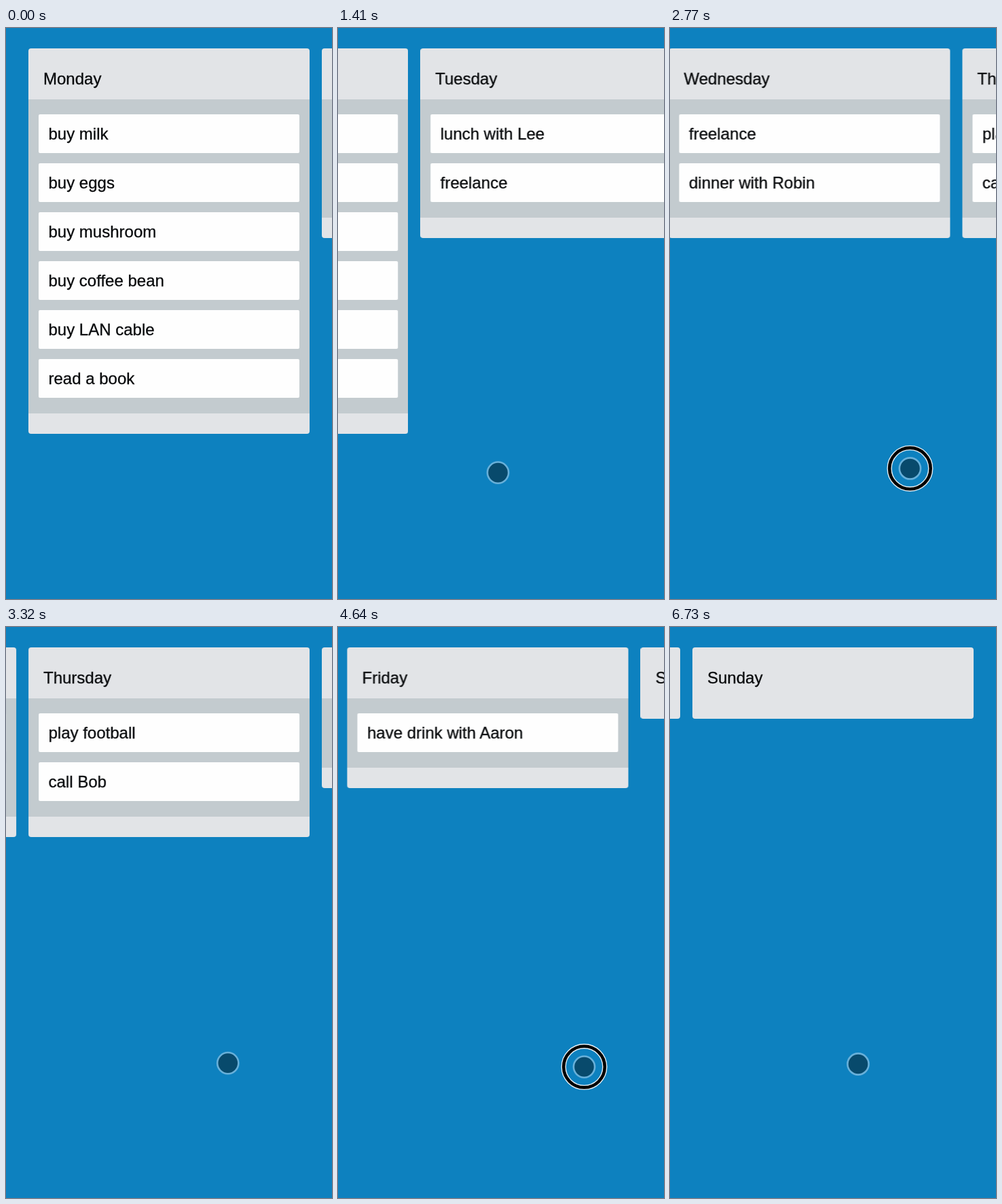
Write an HTML page with a canvas that moves like this. It is 480x840 px and loops after 7190 ms.

```html
<!DOCTYPE html>
<html lang="en">
<head>
<meta charset="utf-8">
<title>Week board</title>
<style>
html, body { margin: 0; width: 100%; height: 100%; overflow: hidden; background: #0d81bf; }
body { position: relative; font: 24px "Liberation Sans", Arial, sans-serif; color: #080a0c; }
#board {
  position: absolute; left: 32.6px; top: 30px; will-change: transform;
  -webkit-text-stroke: 0.3px #080a0c;
}
.list {
  position: absolute; top: 0; width: 414px; padding-bottom: 30px;
  background: #e2e4e7; border-radius: 4px; white-space: nowrap;
}
.title { height: 75px; line-height: 89px; padding-left: 22px; }
.cards { padding: 22px 15px 23px; background: #c3cbcf; }
.card {
  height: 57px; line-height: 57px; padding-left: 14.5px; margin-top: 15px;
  background: #fefefe; border-radius: 2px;
}
.card:first-child { margin-top: 0; }
canvas { position: absolute; left: 0; top: 0; }
</style>
</head>
<body>
<div id="board"></div>
<canvas id="pointer" width="480" height="840"></canvas>
<script>
const LOOP = 7190, FPS = 22, PITCH = 432;
const ENTER = 140, SETTLE = 770, SNAP = 350;
const REACH = 300, LEFT = 40, DRAG_Y = 663;

const week = [
  ["Monday", "buy milk", "buy eggs", "buy mushroom", "buy coffee bean", "buy LAN cable", "read a book"],
  ["Tuesday", "lunch with Lee", "freelance"],
  ["Wednesday", "freelance", "dinner with Robin"],
  ["Thursday", "play football", "call Bob"],
  ["Friday", "have drink with Aaron"],
  ["Saturday"],
  ["Sunday"]
];

// Each swipe is pressed at (x, y) and drags left until it is released.
const swipes = [
  { down: 860, up: 1275, x: 390, y: 688 },
  { down: 1980, up: 2242, x: 385, y: 645 },
  { down: 2715, up: 2975, x: 388, y: 646 },
  { down: 3800, up: 4060, x: 378, y: 637 },
  { down: 4598, up: 4868, x: 382, y: 646 },
  { down: 5575, up: 5775, x: 196, y: 650 }
];
const entry = { x: 480, y: 668 };
const rest = { down: 6730, x: 277, y: 643 };

const clamp = u => Math.min(1, Math.max(0, u));
const smooth = u => u * u * (3 - 2 * u);
const easeOut = u => 1 - (1 - u) ** 3.2;
const part = (t, from, to) => clamp((t - from) / (to - from));
const mix = (a, b, u) => ({ x: a.x + (b.x - a.x) * u, y: a.y + (b.y - a.y) * u });
const reach = s => Math.min(REACH, s.x - LEFT);
const dragged = (s, t) => smooth(part(t, s.down, s.up));

function pointerAt(t) {
  const i = swipes.findLastIndex(s => t >= s.down);
  if (i < 0) return mix(entry, swipes[0], easeOut(part(t, ENTER, SETTLE)));
  const s = swipes[i], next = swipes[i + 1] || rest;
  const end = { x: s.x - reach(s), y: DRAG_Y };
  return t < s.up
    ? mix(s, end, dragged(s, t))
    : mix(end, next, easeOut(part(t, s.up, next.down)));
}

// The list sticks to the pointer while dragged, then snaps to the next column.
function scrollAt(t) {
  return swipes.reduce((sum, s) => sum + reach(s) * dragged(s, t)
    + (PITCH - reach(s)) * smooth(part(t, s.up, s.up + SNAP)), 0);
}

function add(parent, className, text = "") {
  const el = document.createElement("div");
  el.className = className;
  el.textContent = text;
  return parent.appendChild(el);
}

const board = document.getElementById("board");
week.forEach(([day, ...tasks], i) => {
  const list = add(board, "list");
  list.style.left = i * PITCH + "px";
  add(list, "title", day);
  if (!tasks.length) return;
  const cards = add(list, "cards");
  tasks.forEach(task => add(cards, "card", task));
});

const ctx = document.getElementById("pointer").getContext("2d");

function disc({ x, y }, r, color) {
  ctx.beginPath();
  ctx.arc(x, y, r, 0, Math.PI * 2);
  ctx.fillStyle = color;
  ctx.fill();
}

function ring({ x, y }, r, color, width) {
  ctx.beginPath();
  ctx.arc(x, y, r, 0, Math.PI * 2);
  ctx.lineWidth = width;
  ctx.strokeStyle = color;
  ctx.stroke();
}

function drawPointer(t) {
  ctx.clearRect(0, 0, 480, 840);
  if (t < ENTER) return;
  const p = pointerAt(t);
  disc(p, 15, "#084a6c");
  ring(p, 15.6, "#68b0d9", 2.6);
  if (swipes.some(s => t >= s.down && t < s.up)) {
    ring(p, 30.3, "#e4eef4", 7.4);
    ring(p, 30.3, "#000", 4.6);
  }
}

const start = performance.now();

function draw() {
  const now = (performance.now() - start) % LOOP;
  const step = Math.floor((now + 5) * FPS / 1000);
  const t = Math.round(step * 100 / FPS) * 10;
  board.style.transform = `translateX(${-scrollAt(t)}px)`;
  drawPointer(t);
  requestAnimationFrame(draw);
}
draw();
</script>
</body>
</html>
```
